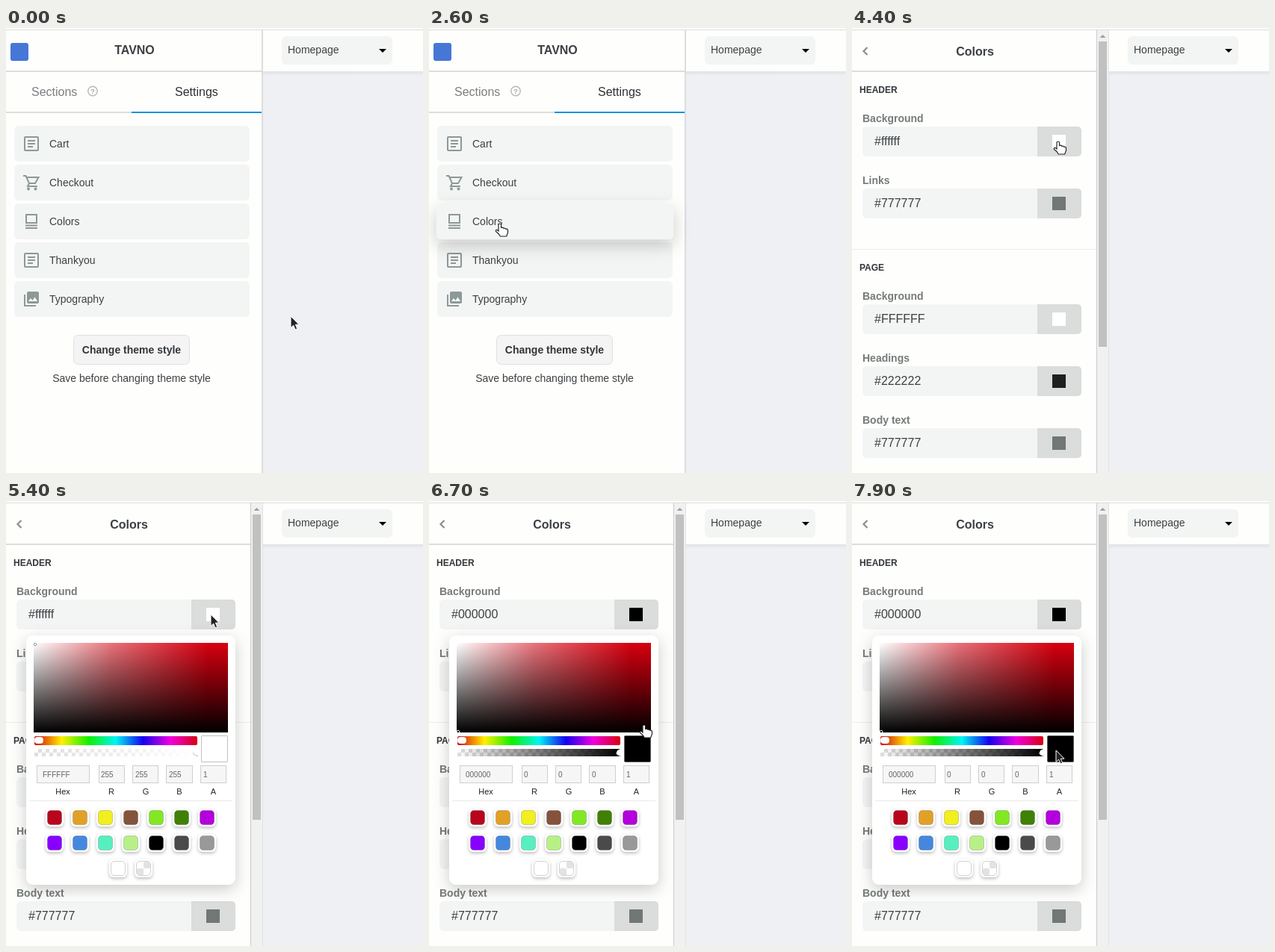
An HTML page for the animation above (8000 ms loop, 558x596 px).

```html
<!DOCTYPE html>
<html lang="en">
<head>
<meta charset="utf-8">
<title>Theme settings</title>
<style>
  html, body { margin: 0; width: 100%; height: 100%; overflow: hidden; background: #fefefc; }
  svg { display: block; font-family: "Liberation Sans", Arial, sans-serif; }
  .item { transform-box: fill-box; transform-origin: center; }
  #picker > rect:first-child { filter: drop-shadow(0 6px 10px rgba(0, 0, 0, .2)); }
  .chip { filter: drop-shadow(0 2px 2px rgba(0, 0, 0, .25)); }
  .cur { fill: var(--c); }
  stop.cur { stop-color: var(--c); }
</style>
</head>
<body>
<svg id="stage" width="558" height="596" viewBox="0 0 558 596"></svg>
<script>
const INK = '#3c4043', SOFT = '#f3f5f4', ICON = '#8d9997', LINE = '#dcdddd';
const LOOP = 8000, SWAP = 2800, OPEN = 4800, BLACK = 6700;

const rect = (x, y, w, h, fill, rx = 0, extra = '') =>
  `<rect x="${x}" y="${y}" width="${w}" height="${h}" fill="${fill}" rx="${rx}" ${extra}/>`;
const text = (s, x, y, size, fill = INK, extra = '') =>
  `<text x="${x}" y="${y}" font-size="${size}" fill="${fill}" ${extra}>${s}</text>`;
const path = (d, extra) => `<path d="${d}" ${extra}/>`;
const stroke = (color, w) => `fill="none" stroke="${color}" stroke-width="${w}"`;
const bold = 'font-weight="700"', mid = 'text-anchor="middle"';
const gradient = (id, stops, extra = '') => `<linearGradient id="${id}" ${extra}>` +
  stops.map(([at, color, op = 1]) =>
    `<stop offset="${at}" stop-color="${color}" stop-opacity="${op}"/>`).join('') + '</linearGradient>';
const down = 'x1="0" x2="0" y1="0" y2="1"';

const defs = `<defs>
  ${gradient('edge', [[0, '#e0e1e6'], [1, '#eff0f4']], down)}
  ${gradient('white', [[0, '#fff'], [.4, '#fff', .45], [.9, '#fff', 0]])}
  ${gradient('dark', [[0, '#000', 0], [1, '#000']], down)}
  ${gradient('hue', ['#d8000f', '#fff000', '#10f000', '#00f4f4', '#1400f0', '#f000e0', '#d8000f']
    .map((c, i) => [i / 6, c]))}
  <linearGradient id="alpha"><stop class="cur" offset="0" stop-opacity="0"/><stop class="cur" offset="1"/></linearGradient>
  <pattern id="check" x="38" y="332" width="10" height="10" patternUnits="userSpaceOnUse">
    ${rect(0, 0, 10, 10, '#fff')}${rect(5, 0, 5, 5, '#dedede')}${rect(0, 5, 5, 5, '#dedede')}</pattern>
</defs>`;

// Icons are centred on 0,0
const page = rect(-9, -9, 18, 18, 'none', 1, `stroke="${ICON}" stroke-width="2"`) +
  path('M-5-4H5M-5 0H5M-5 4H2', stroke(ICON, 2));
const cart = path('M-11-9H-7.5L-3 1H5L9.5-7H-6M-3 1L-5 5H8', stroke(ICON, 2)) +
  `<g fill="${ICON}"><circle cx="-4" cy="8.5" r="2"/><circle cx="5.5" cy="8.5" r="2"/></g>`;
const palette = path('M-7-9H7V2H-7ZM-8 5.5H8M-8 9H8', stroke(ICON, 2));
const gallery = rect(-6, -10, 16, 16, ICON, 2) + path('M-9-6V9H6', stroke(ICON, 2)) +
  path('M-4 3L-1-1L1.5 2L4.5-2.5L8 3Z', 'fill="#fff"');

const items = [['Cart', page], ['Checkout', cart], ['Colors', palette], ['Thankyou', page], ['Typography', gallery]];

const list = `<g id="list">
  ${rect(342, 3, 2, 593, LINE)}${rect(0, 57, 342, 2, LINE)}
  ${rect(6, 20, 24, 24, '#4677d6', 3)}
  ${text('TAVNO', 172, 35, 16, INK, bold + ' ' + mid)}
  ${text('Sections', 34, 91, 16, '#7b7f80')}
  <circle cx="116" cy="84.500" r="6.200" ${stroke('#b4b8b8', 1.4)}/>
  ${text('?', 116, 88, 9.5, '#a6abab', bold + ' ' + mid)}
  ${text('Settings', 226, 91, 16, '#2d3033')}
  ${rect(0, 112, 168, 2, LINE)}${rect(168, 112, 174, 2, '#1b91dc')}
  ${items.map(([name, icon], i) => `<g class="row">
    ${rect(11, 131 + 52 * i, 315, 48, SOFT, 6, 'class="item"')}
    <g transform="translate(34 ${155 + 52 * i})">${icon}</g>
    ${text(name, 58, 160 + 52 * i, 14)}</g>`).join('')}
  ${rect(90.5, 411.5, 155, 39, '#f4f4f5', 6, 'stroke="#dfe2e2"')}
  ${text('Change theme style', 168, 436, 14, '#33373a', bold + ' ' + mid)}
  ${text('Save before changing theme style', 168, 474, 14, INK, mid)}
</g>`;

const field = (label, value, color, y, id = '') =>
  text(label, 14, y, 14, '#757b7a', bold) +
  rect(14, y + 6, 293, 40, SOFT, 6) +
  path(`M248 ${y + 6}h54a5 5 0 0 1 5 5v30a5 5 0 0 1-5 5h-54z`, 'fill="#dadddb"') +
  text(value, 30, y + 31, 16, INK, id && `id="${id}"`) +
  rect(268, y + 17, 18, 18, color, 0, id && 'class="cur"');

const colors = `<g id="colors">
  ${rect(0, 57, 327, 2, LINE)}${rect(327, 3, 1, 593, '#c9caca')}
  ${rect(328, 3, 15, 593, '#f1f1f1')}${rect(343, 3, 1, 593, '#e2e3e5')}
  ${rect(330, 18, 11, 409, '#c1c1c1')}
  ${path('M331.500 13L335.500 9L339.500 13Z', 'fill="#a0a0a0"')}
  ${path('M20.500 26L15.500 31L20.500 36', stroke('#8b8f8f', 2.2))}
  ${text('Colors', 164.5, 37, 16, INK, bold + ' ' + mid)}
  ${text('HEADER', 10, 87, 12, '#33373a', bold)}
  ${field('Background', '#ffffff', '#fff', 126, 'main')}
  ${field('Links', '#777777', '#707775', 209)}
  ${rect(0, 296, 327, 1, '#ececec')}
  ${text('PAGE', 10, 325, 12, '#33373a', bold)}
  ${field('Background', '#FFFFFF', '#fff', 364)}
  ${field('Headings', '#222222', '#1f1f1f', 447)}
  ${field('Body text', '#777777', '#707775', 530)}
</g>`;

const entry = (label, x, w, tx, lx) =>
  rect(x + .5, 354.5, w - 1, 23, '#f5f6f5', 0, 'stroke="#cdcfce"') +
  text(label === 'A' ? 1 : '', tx, 370, 10, '#666', `id="in${label}"`) +
  text(label, lx, 393, 11, '#222', mid);
const chip = (fill, x, y) => rect(x - 12, y - 12, 24, 24, '#fff', 6, 'class="chip"') +
  rect(x - 9.5, y - 9.5, 19, 19, fill, 4.5, 'stroke="#000" stroke-opacity=".18"');
const chips = ['#b9051b', '#e3a027', '#f0ef20', '#85533b', '#82e824', '#408005', '#b400dc',
  '#8800ff', '#4488dd', '#58efc0', '#b8f088', '#000', '#4a4a4a', '#999'];

const picker = `<g id="picker">
  ${rect(27, 180, 280, 334, '#fff', 9)}
  ${['#d8000f', 'url(#white)', 'url(#dark)'].map(f => rect(37, 190, 260, 120, f)).join('')}
  <circle id="dot" cx="39" r="1.800" fill="none" stroke="#fff"/>
  ${rect(38, 315, 218, 12, 'url(#hue)', 2)}
  ${rect(38, 316, 12, 9, '#fff', 4, 'stroke="#888" stroke-opacity=".4" stroke-width=".6"')}
  ${rect(38, 332, 218, 10, 'url(#check)')}${rect(38, 332, 218, 10, 'url(#alpha)')}
  ${path('M257 342Q251 341 251 337Q251 333 257 332Z', 'fill="#fff"')}
  ${path('M250.500 337Q251 341 257 341.500', stroke('#bbb', 1))}
  ${rect(261.5, 314.5, 35, 35, '#fff', 1, 'class="cur" stroke="#000" stroke-opacity=".25"')}
  ${entry('Hex', 41, 71, 49, 76)}${entry('R', 124, 35, 127, 141)}${entry('G', 169, 35, 173, 187)}
  ${entry('B', 214, 36, 218, 232)}${entry('A', 260, 35, 264, 277.5)}
  ${rect(31, 401, 272, 1, '#e9eaea')}
  ${chips.map((c, i) => chip(c, 65 + 34 * (i % 7), i < 7 ? 424 : 458)).join('')}
  ${chip('#fff', 150, 492)}${chip('#fff', 184, 492)}
  ${rect(184, 483, 9, 9, '#e2e2e2', 2)}${rect(175, 492, 9, 9, '#e2e2e2', 2)}
</g>`;

const preview = rect(344, 58, 214, 538, '#eff0f4') + rect(344, 58, 214, 6, 'url(#edge)') +
  rect(369, 11, 148, 38, SOFT, 6) + text('Homepage', 377, 34, 14) +
  path('M499 28H509L504 33Z', 'fill="#000"');

const pointer = `<g id="pointer">
  ${path('M0 0V15.500L3.600 12.200L6 17.800L8.700 16.700L6.300 11.200H11Z', 'fill="#222" stroke="#fff"')}
  ${path('M-2 10V1.500Q-2 0 -.3 0Q1.500 0 1.500 1.500V5.500Q4 4.600 4.800 6.300Q7 5.500 7.800 7.200Q10.500 6.500 10.500 9.500V12L8.700 17H.3L-2 13.500L-5.500 10.500Q-6 8 -4 8.300Z',
    'fill="#fff" stroke="#222" stroke-width="1.200"')}
</g>`;

const $ = id => document.getElementById(id);
const stage = $('stage');
stage.innerHTML = defs + rect(0, 0, 558, 596, '#fefefc') + preview + list + colors + picker +
  rect(0, 2, 558, 1, '#dadbdb') + pointer;
const rows = [...document.querySelectorAll('.row')];
const [arrow, hand] = $('pointer').children;
const show = (el, on) => { el.style.display = on ? '' : 'none'; };

// time, x, y, hand shape
const keys = [
  [0, 381, 386, 0], [600, 381, 386, 0], [900, 324, 366, 1], [1500, 130, 276, 1], [1700, 130, 276, 1],
  [2400, 95, 262, 1], [2800, 95, 262, 0], [3400, 95, 262, 0], [4000, 274, 156, 1], [4200, 274, 156, 1],
  [4400, 276, 152, 1], [5000, 276, 152, 1], [5100, 274, 152, 0], [5400, 274, 152, 0], [5600, 275, 186, 1],
  [6000, 277, 252, 1], [6100, 277, 252, 1], [6500, 284, 297, 1], [6600, 284, 297, 1], [6900, 300, 309, 1],
  [7300, 300, 309, 0], [7400, 296, 323, 0], [7900, 273, 334, 0], [LOOP, 273, 334, 0]
];

function cursorAt(t) {
  const i = keys.findIndex(k => k[0] > t);
  const [t0, x0, y0, isHand] = keys[i - 1], [t1, x1, y1] = keys[i];
  const p = (t - t0) / (t1 - t0), e = p * p * (3 - 2 * p);
  return { x: x0 + (x1 - x0) * e, y: y0 + (y1 - y0) * e, isHand };
}

// Share of the last 200 ms the cursor spent over a row
function hover(row, t) {
  let n = 0;
  for (let k = 0; k < 10; k++) {
    const { x, y } = cursorAt(Math.max(0, t - k * 20));
    if (x < 326 && Math.floor((y - 129) / 52) === row) n++;
  }
  return n / 10;
}

function draw(t) {
  const inList = t < SWAP, black = t >= BLACK;
  show($('list'), inList);
  show($('colors'), !inList);
  show($('picker'), t >= OPEN);
  if (inList) rows.forEach((row, i) => {
    const h = hover(i, t), box = row.firstElementChild;
    box.style.transform = `scale(${1 + .008 * h})`;
    box.style.filter = h ? `drop-shadow(0 8px 11px rgba(0,0,0,${.2 * h}))` : '';
    // Raised rows sit above their neighbours' boxes
    if (h > .5 && row !== row.parentNode.lastElementChild) row.parentNode.append(row);
  });

  stage.style.setProperty('--c', black ? '#000' : '#fff');
  $('main').textContent = black ? '#000000' : '#ffffff';
  $('inHex').textContent = black ? '000000' : 'FFFFFF';
  for (const c of 'RGB') $('in' + c).textContent = black ? 0 : 255;
  $('dot').setAttribute('cy', black ? 309 : 192);
  $('dot').setAttribute('stroke', black ? '#fff' : '#999');

  const { x, y, isHand } = cursorAt(t);
  $('pointer').setAttribute('transform', `translate(${Math.round(x)} ${Math.round(y)})`);
  show(arrow, !isHand);
  show(hand, isHand);
}

const start = performance.now();
function tick() {
  const t = (performance.now() - start) % LOOP;
  draw(Math.floor(t / 100) * 100);
  requestAnimationFrame(tick);
}
tick();
</script>
</body>
</html>
```
